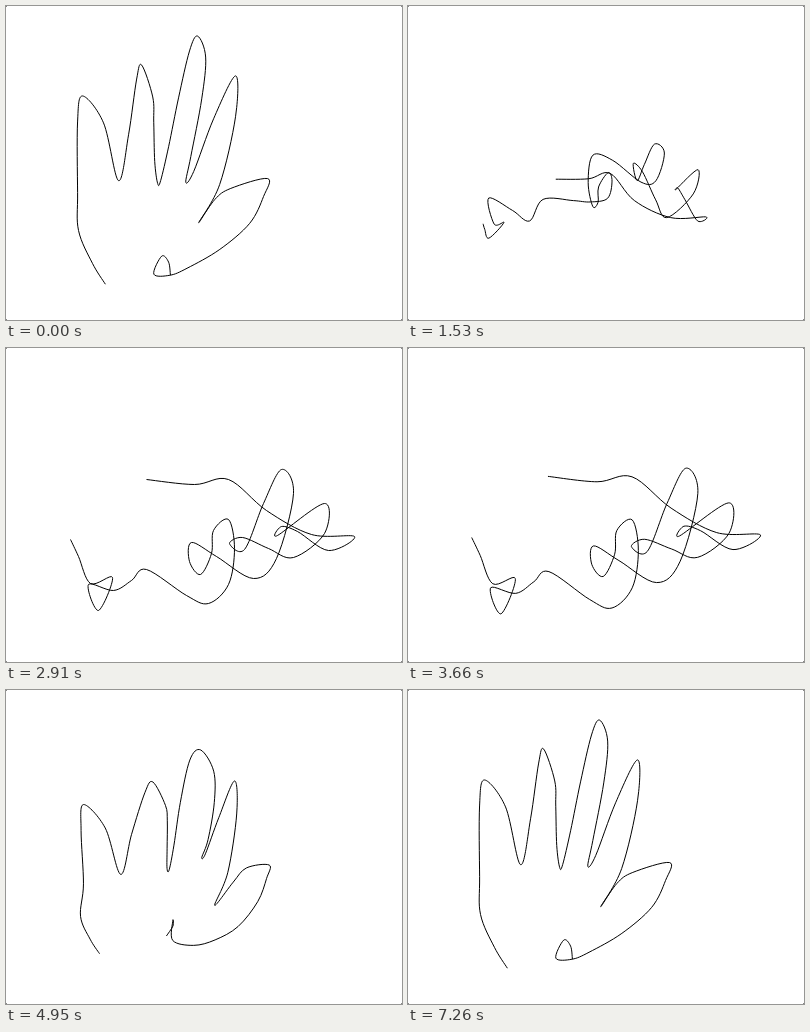
An HTML page for the animation above (7.29 s loop, 396x314 px).

```html
<!DOCTYPE html>
<html>
<head>
<meta charset="utf-8">
<style>
  html, body { margin: 0; width: 100%; height: 100%; overflow: hidden; background: #fff; }
  svg { display: block; }
  path { fill: none; stroke: #000; stroke-width: 1; }
  rect { fill: #888; }
</style>
</head>
<body>
<svg width="396" height="314" viewBox="0 0 396 314">
  <rect width="1" height="1"/>
  <rect x="395" width="1" height="1"/>
  <rect y="313" width="1" height="1"/>
  <rect x="395" y="313" width="1" height="1"/>
  <path id="line"/>
</svg>
<script>
const LOOP = 7290, STEP = 30, KEEP = 0.95;
const OUT = 870, BACK = 3900; // when each easing begins
const TANGLE_AT = 0.9695;     // progress at which the line passes through `tangle`

const hand = [
  99,278, 86,257, 72,224, 71,186, 71,115, 76,89, 97,116, 112,174, 122,128, 130,72,
  135,58, 146,90, 147,116, 148,155, 151,177, 154,174, 162,140, 172,91, 183,44, 191,29,
  199,50, 195,92, 184,150, 179,176, 187,165, 207,112, 229,69, 229,110, 213,178, 192,216,
  208,193, 224,182, 261,172, 257,190, 243,217, 213,243, 180,262, 163,269, 147,268, 155,250,
  162,256, 164,269
];
const tangle = [
  64,191, 72,208, 84,235, 106,229, 92,262, 82,236, 107,242, 125,232, 140,221, 180,247,
  202,255, 222,236, 228,200, 222,171, 207,182, 205,205, 194,226, 183,213, 185,194, 210,208,
  247,230, 270,210, 287,145, 275,121, 257,155, 238,201, 223,195, 236,189, 262,200, 287,209,
  318,185, 318,155, 271,187, 275,178, 291,183, 322,202, 348,188, 305,186, 260,162, 222,131,
  188,136, 140,131
];

// Each step closes 5% of the remaining distance.
const left = ms => KEEP ** Math.floor(ms / STEP);

function progress(t) {
  if (t >= OUT && t < BACK) return 1 - left(t - OUT);
  const since = t < OUT ? t + LOOP - BACK : t - BACK;
  return (1 - left(BACK - OUT)) * left(since);
}

// Smooth Catmull-Rom curve through the points.
function curve(pts) {
  const at = i => pts[Math.max(0, Math.min(pts.length - 1, i))];
  const handle = (i, sign) =>
    [0, 1].map(k => at(i)[k] + sign * (at(i + 1)[k] - at(i - 1)[k]) / 6);
  let d = "M" + pts[0];
  for (let i = 1; i < pts.length; i++)
    d += "C" + [handle(i - 1, 1), handle(i, -1), pts[i]].join(" ");
  return d;
}

const line = document.getElementById("line");

function draw() {
  const q = progress(performance.now() % LOOP) / TANGLE_AT;
  const mix = i => hand[i] + (tangle[i] - hand[i]) * q + 0.5;
  const pts = [];
  for (let i = 0; i < hand.length; i += 2) pts.push([mix(i), mix(i + 1)]);
  line.setAttribute("d", curve(pts));
  requestAnimationFrame(draw);
}
draw();
</script>
</body>
</html>
```
